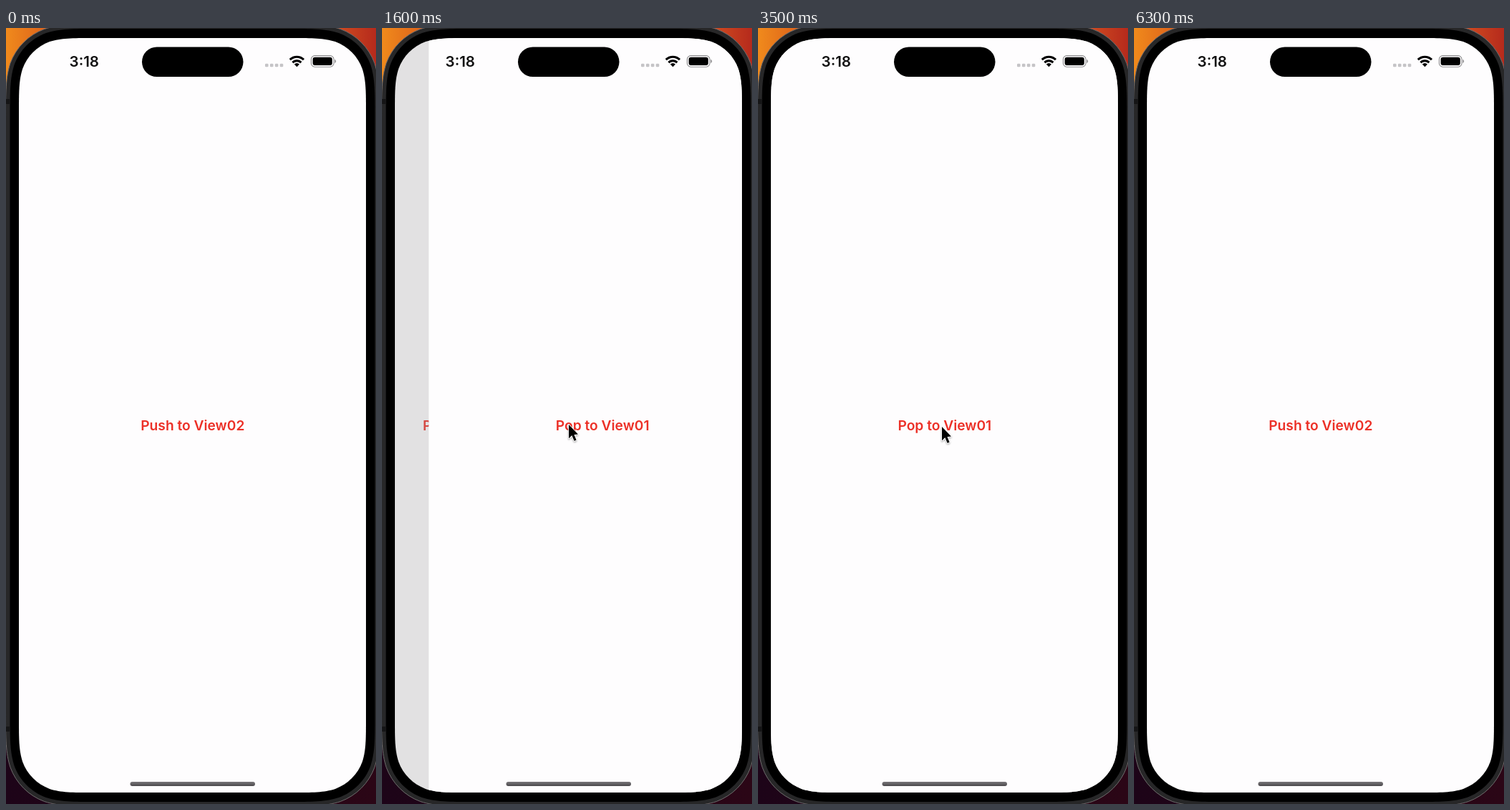
An HTML page for the animation above (6400 ms loop, 517 px wide and 1082 px high).

```html
<!DOCTYPE html>
<html lang="en">
<head>
<meta charset="utf-8">
<title>Push and pop</title>
<style>
  html, body { margin: 0; width: 100%; height: 100%; overflow: hidden; background: #1a0412; }
  svg { display: block; width: 517px; height: 1082px; }
  text { font-family: Inter, Roboto, sans-serif; font-weight: 600; }
  .label { font-size: 19.2px; fill: #ec3027; text-anchor: middle; }
</style>
</head>
<body>
<svg viewBox="0 0 517 1082">
  <defs>
    <linearGradient id="sky" x1="0" x2="1" y1="0" y2="0">
      <stop offset="0" stop-color="#f08a1c"/>
      <stop offset=".12" stop-color="#dc5f1a"/>
      <stop offset=".9" stop-color="#cf4a20"/>
      <stop offset="1" stop-color="#b52a1c"/>
    </linearGradient>
    <linearGradient id="ground" x1="0" x2="1" y1="0" y2="0">
      <stop offset="0" stop-color="#1d0418"/>
      <stop offset="1" stop-color="#2b0616"/>
    </linearGradient>
    <linearGradient id="bar" x1="0" x2="0" y1="0" y2="1">
      <stop offset="0" stop-color="#7a787b"/>
      <stop offset="1" stop-color="#4a484b"/>
    </linearGradient>
    <clipPath id="screen"><path id="screenShape"/></clipPath>
    <filter id="soft" x="-50%" y="-50%" width="200%" height="200%">
      <feDropShadow dx="0" dy="1.2" stdDeviation="1.3" flood-opacity=".4"/>
    </filter>
  </defs>

  <rect width="517" height="541" fill="url(#sky)"/>
  <rect y="541" width="517" height="541" fill="url(#ground)"/>
  <path id="rim" fill="#272728" stroke="#6d6b6b"/>
  <path d="M0 99h5v7H0zM0 974h5v7H0z" fill="#151516"/>
  <path id="bezel"/>

  <g clip-path="url(#screen)">
    <g id="first">
      <rect x="18" y="14" width="640" height="1052" fill="#fefdfe"/>
      <text id="push" class="label" x="260.8" y="561">Push to View02</text>
    </g>
    <rect id="dim" x="18" y="14" width="485" height="1052"/>
    <g id="second">
      <rect x="18" y="14" width="485" height="1052" fill="#fefdfe"/>
      <text id="pop" class="label" x="260.8" y="561">Pop to View01</text>
    </g>
  </g>

  <rect x="190" y="26.5" width="141.5" height="41.5" rx="20.75"/>
  <text x="109.3" y="54" font-size="20.5" text-anchor="middle" fill="#111">3:18</text>
  <g id="dots" fill="#c5c4c7"></g>
  <g fill="none" stroke="#000" stroke-width="3.1">
    <path d="M396.8 44.2a13.6 13.6 0 0 1 19.2 0"/>
    <path d="M400.4 48.1a8.6 8.6 0 0 1 12 0"/>
  </g>
  <path d="M402.8 50.6a5 5 0 0 1 7.2 0L406.4 54.2z"/>
  <rect x="426.4" y="38.6" width="31.6" height="15.6" rx="5" fill="none" stroke="#8d8c8e" stroke-width="1.1"/>
  <rect x="428.6" y="40.8" width="27.2" height="11.2" rx="3"/>
  <path d="M459.4 43.8q1.7 .8 1.7 2.6t-1.7 2.6z" fill="#8d8c8e"/>
  <rect x="173.5" y="1051" width="174.5" height="6" rx="3" fill="url(#bar)"/>

  <path id="cursor" d="M0 0V19.2L4.3 15.1 7.6 22.7 10.6 21.4 7.4 13.9 13 13.5z"
        stroke="#fff" stroke-width="1.6" stroke-linejoin="round" paint-order="stroke" filter="url(#soft)"/>
</svg>
<script>
const LOOP = 6400, STEP = 100, WIDTH = 485;
const PUSH_AT = 1400, POP_AT = 3600;
const $ = id => document.getElementById(id);

// Rounded rectangle with continuous-curvature corners
function squircle(x, y, w, h, r) {
  const corner = [[0, .8684], [0, .8684], [.0749, .6315],
                  [.1691, .3728], [.3728, .1691], [.6315, .0749],
                  [.8684, 0], [1.0885, 0], [1.5287, 0]];
  corner[0] = [0, 1.0885];
  const start = [0, 1.5287];
  const points = [start, ...corner];
  const back = [...points].reverse();
  const place = (list, right, bottom) => list.map(([a, b]) =>
    [right ? x + w - a * r : x + a * r, bottom ? y + h - b * r : y + b * r]);
  const draw = list => list[0].join() + "C" + list.slice(1).map(p => p.join()).join(" ");
  return "M" + [place(points, 0, 0), place(back, 1, 0),
                place(points, 1, 1), place(back, 0, 1)].map(draw).join("L") + "Z";
}

$("screenShape").setAttribute("d", squircle(18, 14, WIDTH, 1052, 68));
$("bezel").setAttribute("d", squircle(5.5, 1, 510, 1078, 80));
$("rim").setAttribute("d", squircle(-.5, -5, 522, 1090, 86));
for (let i = 0; i < 4; i++) {
  $("dots").innerHTML += `<rect x="${362 + i * 6.9}" y="49.8" width="4.6" height="4.4" rx="1.3"/>`;
}

// Critically damped spring, settled after half a second
function spring(ms) {
  if (ms <= 0) return 0;
  if (ms >= 500) return 1;
  const k = ms * .0196;
  return 1 - (1 + k) * Math.exp(-k);
}

const press = ms => ms < 0 ? 1 : Math.min(1, .21 + ms * .0031);

const smooth = k => k * k * (3 - 2 * k);

// Cursor stops: time, x, y
const stops = [[500, 420, 1100], [1200, 261, 553], [2000, 261, 553],
               [3400, 257, 556], [3900, 257, 556], [4500, 535, 850]];

function cursorAt(t) {
  const i = stops.findIndex(s => s[0] > t);
  if (i < 1) return null;
  const [t0, x0, y0] = stops[i - 1], [t1, x1, y1] = stops[i];
  const k = smooth((t - t0) / (t1 - t0));
  return [x0 + (x1 - x0) * k, y0 + (y1 - y0) * k];
}

function shift(id, x, y = 0) {
  $(id).setAttribute("transform", `translate(${x} ${y})`);
}

function render(t) {
  const p = spring(t - PUSH_AT) - spring(t - POP_AT);
  shift("first", -.3 * WIDTH * p);
  shift("second", WIDTH * (1 - p));
  $("dim").setAttribute("opacity", .12 * p);
  $("push").setAttribute("opacity", press(t - PUSH_AT));
  $("pop").setAttribute("opacity", press(t - POP_AT));
  const pos = cursorAt(t);
  $("cursor").style.display = pos ? "" : "none";
  if (pos) shift("cursor", ...pos);
}

const begin = performance.now();
function tick() {
  const t = (performance.now() - begin) % LOOP;
  render(Math.floor(t / STEP) * STEP);
  requestAnimationFrame(tick);
}
tick();
</script>
</body>
</html>
```
